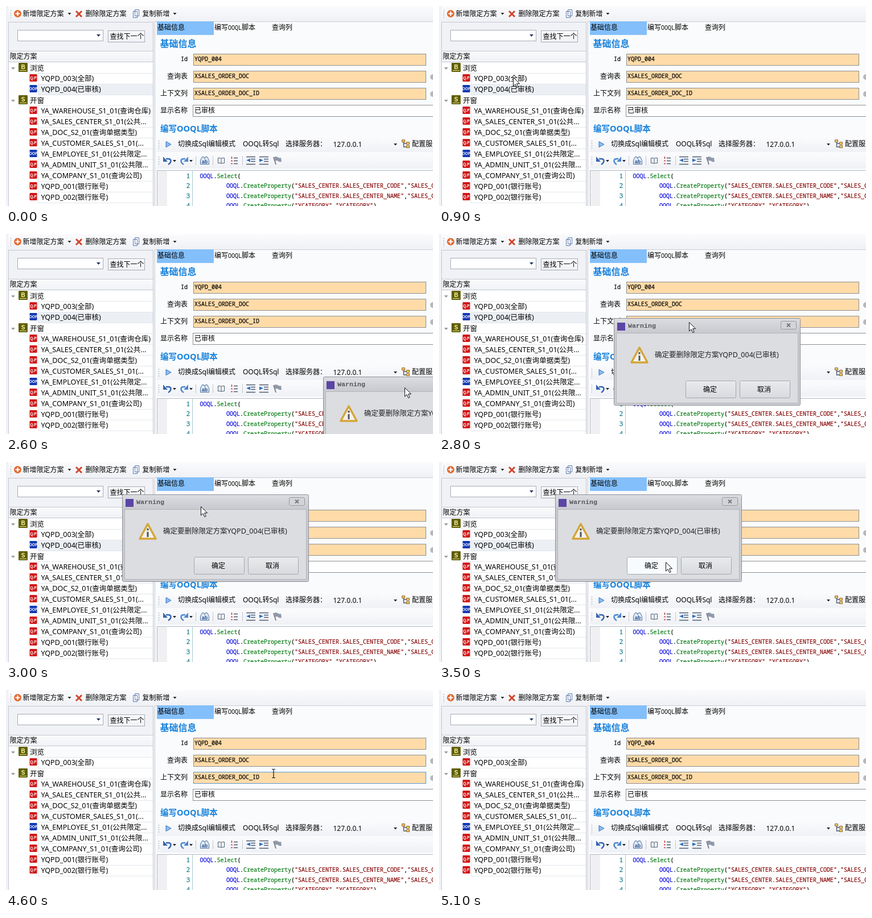
An HTML page for the animation above (5.2 s loop, 750 px wide and 352 px high).

```html
<!DOCTYPE html>
<html lang="zh">
<head>
<meta charset="utf-8">
<title>删除限定方案</title>
<style>
  html, body { margin: 0; width: 100%; height: 100%; overflow: hidden; background: #f1f2f6; }
  svg { display: block; width: 750px; height: 352px; }
  text { font: 12px "Noto Sans", "Noto Sans CJK SC", "Noto Sans CJK", sans-serif; fill: #000; white-space: pre; }
  .tree text.label { font-size: 12.5px; }
  text.mono, tspan.mono { font: 10px "Noto Sans Mono", "Noto Sans CJK SC", monospace; }
  text.mono { stroke: currentColor; stroke-width: .2px; }
  text.head { font-weight: 700; fill: #1681dc; }
  text.icon { font: 700 6.5px "Liberation Sans", sans-serif; fill: #fff; text-anchor: middle; }
  text.num { font: 12px "Liberation Serif", serif; fill: #16808f; stroke: #16808f; stroke-width: .3px; }
  .end { text-anchor: end; }
  .mid { text-anchor: middle; }
  .api { fill: #0a0ae0; stroke: #0a0ae0; }
  .str { fill: #860808; stroke: #860808; }
  .fn { fill: #087c16; stroke: #087c16; }
  .line { fill: none; stroke: #4a5a70; stroke-width: 1.4; }
</style>
</head>
<body>
<svg id="stage" viewBox="0 0 750 352">
  <defs>
    <linearGradient id="bar" x2="0" y2="1">
      <stop stop-color="#fbfbfd"/><stop offset="1" stop-color="#eff1f5"/>
    </linearGradient>
    <linearGradient id="frame" x2="0" y2="1">
      <stop stop-color="#dcdde1"/><stop offset=".16" stop-color="#c9cacf"/><stop offset="1" stop-color="#cbccd1"/>
    </linearGradient>
    <linearGradient id="button" x2="0" y2="1">
      <stop stop-color="#e9eaec"/><stop offset="1" stop-color="#d9dade"/>
    </linearGradient>
    <clipPath id="treeClip"><rect x="4" y="99" width="254" height="253"/></clipPath>
  </defs>

  <rect width="750" height="352" fill="#f1f2f6"/>

  <!-- main toolbar -->
  <rect x="4" width="746" height="27" fill="url(#bar)"/>
  <rect id="hot" x="118.5" y="3.5" width="99" height="21" stroke="#4a90d6"/>
  <path d="M8.500 7v14" stroke="#a8adb8" stroke-dasharray="2 2"/>
  <circle cx="20.500" cy="13.500" r="6.500" fill="#e2672c"/>
  <path d="M20.500 9.500v8M16.500 13.500h8" stroke="#fff" stroke-width="2.200"/>
  <path d="M123 9l10 10M133 9l-10 10" stroke="#d2452f" stroke-width="3"/>
  <path d="M223.500 9.500h7v11h-7zM226.500 6.500h7v11h-7z" fill="#fff" stroke="#5874a8"/>
  <text x="29.500" y="18">新增限定方案</text>
  <text x="139.500" y="18">删除限定方案</text>
  <text x="239.500" y="18">复制新增</text>
  <path d="M108.500 12h6l-3 3.500zM293.500 12h6l-3 3.500z" fill="#222"/>

  <!-- search strip -->
  <path d="M4.500 28v324M4 28.500h255M258.500 28v324" stroke="#c3c7d0" fill="none"/>
  <rect x="20.500" y="42.500" width="150" height="19" fill="#fff" stroke="#a7abb5"/>
  <path d="M159 50h7l-3.500 4z" fill="#1d3660"/>
  <rect x="179.500" y="43.500" width="64" height="20" fill="url(#bar)" stroke="#a7abb5"/>
  <text x="182.500" y="58">查找下一个</text>

  <!-- tree -->
  <rect x="5" y="79" width="253" height="20" fill="url(#bar)"/>
  <path d="M5 79.500h253M5 98.500h253" stroke="#c3c7d0"/>
  <text x="6.500" y="93">限定方案</text>
  <rect x="5" y="99" width="253" height="253" fill="#fff"/>
  <g class="tree" clip-path="url(#treeClip)">
    <g id="before"></g>
    <g id="after"></g>
  </g>

  <!-- form -->
  <rect x="261" y="27" width="489" height="325" fill="#fafbfc"/>
  <path d="M261.500 27v325M261 27.500h489" stroke="#c8ccd4"/>
  <rect x="265" y="27" width="100" height="24" fill="#83bffb"/>
  <text x="266" y="42">基础信息</text>
  <text x="366" y="42">编写<tspan class="mono">OOQL</tspan>脚本</text>
  <text x="467" y="42">查询列</text>
  <text class="head" x="270.500" y="72" style="font-size:16px">基础信息</text>
  <text class="mono end" x="319" y="97">Id</text>
  <text class="end" x="319" y="128">查询表</text>
  <text class="end" x="319" y="158">上下文列</text>
  <text x="271" y="188">显示名称</text>
  <g id="fields"></g>
  <circle cx="750" cy="125" r="5" fill="#b5b7bb"/>
  <circle cx="750" cy="155" r="5" fill="#b5b7bb"/>
  <text class="head" x="271" y="221" style="font-size:14.500px">编写OOQL脚本</text>

  <!-- script toolbars -->
  <rect x="265" y="231" width="485" height="26" fill="url(#bar)"/>
  <rect x="265" y="260" width="485" height="26" fill="url(#bar)"/>
  <path d="M268.500 237v14M268.500 265v14" stroke="#a8adb8" stroke-dasharray="2 2"/>
  <path d="M281 238.500l9 5-9 5z" fill="#8dbcf0" stroke="#2d74c4"/>
  <text x="302" y="247">切换成Sql编辑模式</text>
  <text x="416" y="247">OOQL转Sql</text>
  <text x="491" y="247">选择服务器：</text>
  <text x="574.500" y="247.500">127.0.0.1</text>
  <path d="M681 242h6l-3 3.500z" fill="#222"/>
  <path d="M698.500 237v11h5M698.500 242h5" class="line"/>
  <path d="M695.500 235.500h5v4h-5zM703.500 239.500h5v4h-5zM703.500 245.500h5v4h-5z" fill="#f5c469" stroke="#8a6a30"/>
  <text x="713" y="247">配置服务器</text>
  <path d="M281 269h4c6 0 6 6 0 10" fill="none" stroke="#3566ae" stroke-width="2.500"/>
  <path d="M276 265v9h8z" fill="#3566ae"/>
  <path d="M315 269h-3c-6 0-6 6 0 10" fill="none" stroke="#4b86ce" stroke-width="2.500"/>
  <path d="M320 265v9h-8z" fill="#4b86ce"/>
  <path d="M293 271h6l-3 3.500zM322 271h6l-3 3.500z" fill="#222"/>
  <path d="M333.500 264v16M363.500 264v16M415.500 264v16" stroke="#c3c7d0"/>
  <path d="M341.500 278.500v-7l3-6h3l1.500 3 1.500-3h3l3 6v7z" fill="#dfe8f3" stroke="#486d9f"/>
  <text class="icon" x="349" y="277" style="font-size:9px;fill:#24508c">ab</text>
  <path d="M372.500 267.500h4l1.500 1 1.500-1h4v9h-4l-1.500 1-1.500-1h-4zM378 268v9" class="line" style="stroke-width:1"/>
  <path d="M400 267.500h7M400 272.500h7M400 277.500h7" class="line"/>
  <path d="M396.500 265v4M395 272.500h3M395 277.500h3" stroke="#c33" stroke-width="1.500"/>
  <g id="indents"></g>
  <path d="M470 266l4 13" stroke="#667" stroke-width="1.500"/>
  <path d="M471 266q4-2 6 0t6 1l1 7q-4 1-6-1t-5 0z" fill="#8e99aa"/>

  <!-- editor -->
  <rect x="265.500" y="289.500" width="490" height="70" fill="#fff" stroke="#b4b9c4"/>
  <rect x="266" y="290" width="17" height="62" fill="#f0f0f2"/>
  <path d="M327.500 290v62" stroke="#a9c9d0"/>
  <g id="code"></g>

  <!-- tooltip -->
  <g id="tip">
    <rect x="158" y="48" width="85" height="22" fill="#000" opacity=".25"/>
    <rect x="156.500" y="46.500" width="84" height="21" fill="#fbfbfc" stroke="#777"/>
    <text x="162" y="61" style="fill:#555">删除限定方案</text>
  </g>

  <!-- dialog -->
  <g id="dialog">
    <rect x=".5" y=".5" width="327" height="153" rx="2" fill="url(#frame)" stroke="#8f9198"/>
    <rect x="4.500" y="26.500" width="319" height="123" fill="#dcdde1" stroke="#b3b5bc"/>
    <rect x="6" y="8" width="14" height="14" fill="#5b45a5"/>
    <text x="25" y="17" style="font:700 11.670px 'Liberation Mono',monospace;fill:#55565c">Warning</text>
    <rect x="293.500" y="5.500" width="27" height="14" rx="2" fill="#d3d4d8" stroke="#9799a0"/>
    <path d="M304 9.500l6 6M310 9.500l-6 6" stroke="#73757c" stroke-width="1.800"/>
    <path d="M45 52l14 26h-28z" fill="#f4f2ec" stroke="#d3a638" stroke-width="3.500" stroke-linejoin="round"/>
    <path d="M45 60v3.500M45 66v9" stroke="#50545c" stroke-width="3"/>
    <text x="72" y="69" style="font-size:12.500px;fill:#222">确定要删除限定方案YQPD_004(已审核)</text>
    <rect id="ok" x="126.500" y="110.500" width="88" height="30" rx="2" stroke="#a6a8af"/>
    <rect x="221.500" y="110.500" width="88" height="30" rx="2" fill="url(#button)" stroke="#a6a8af"/>
    <text class="mid" x="169" y="130">确定</text>
    <text class="mid" x="264" y="130">取消</text>
  </g>

  <!-- pointers -->
  <path id="arrow" d="M.5 .5v15.500l3.600-3.400 2.700 6 2.400-1.100-2.600-5.800h5z" fill="#fff" stroke="#111"/>
  <path id="beam" d="M-3 -7.500h2.500l.5 .5 .5-.5h2.500M0 -7v14M-3 7.500h2.500l.5-.5 .5 .5h2.500" fill="none" stroke="#111" stroke-width="1.200"/>
</svg>

<script>
const LOOP = 5200, STEP = 100;
const $ = id => document.getElementById(id);
const show = (id, on) => $(id).setAttribute('visibility', on ? 'visible' : 'hidden');
const fill = (id, color) => $(id).setAttribute('fill', color);

// Tree rows: groups start with an icon letter, blue items with "*".
const windows = [
  'S:开窗', 'YA_WAREHOUSE_S1_01(查询仓库)', 'YA_SALES_CENTER_S1_01(公共...',
  'YA_DOC_S2_01(查询单据类型)', 'YA_CUSTOMER_SALES_S1_01(...',
  '*YA_EMPLOYEE_S1_01(公共限定...', 'YA_ADMIN_UNIT_S1_01(公共限...',
  'YA_COMPANY_S1_01(查询公司)', 'YQPD_001(银行账号)', 'YQPD_002(银行账号)'
];
const browse = ['B:浏览', 'YQPD_003(全部)'];

function row(name, i, picked) {
  const y = 109 + 19 * i, group = name[1] === ':', blue = name[0] === '*';
  const x = group ? 41 : 57;
  const label = name.slice(group ? 2 : blue ? 1 : 0);
  const icon = group
    ? `<path d="M9 ${y - 1}h7l-3.500 4z" fill="#9a9a9a"/>
       <rect x="22" y="${y - 9}" width="16" height="16" rx="1" fill="#5e5e08"/>
       <path d="M24 ${y + 4.5}h12" stroke="#e9e58c"/>
       <text class="icon" x="30" y="${y + 2}" style="font-size:10px;fill:#fbf7a0">${name[0]}</text>`
    : `<rect x="41.500" y="${y - 8}" width="13" height="13" rx="1" fill="${blue ? '#1238b4' : '#d01818'}"/>
       <text class="icon" x="48" y="${y + 1}">${blue ? 'OOP' : 'Q.P'}</text>`;
  return `<rect class="${picked ? 'picked' : ''}" x="${x}" y="${y - 9}" width="${258 - x}" height="18" fill="#fff"/>
    <path d="M${x} ${y + 9.5}H258M${x - .5} ${y - 9}v19" stroke="#e3e6ec"/>
    ${icon}<text class="label" x="${group ? 42 : 61.5}" y="${y + (group ? 4.5 : 3.5)}">${label}</text>`;
}
const rows = (list, picked) => list.map((name, i) => row(name, i, i === picked)).join('');
$('before').innerHTML = rows([...browse, '*YQPD_004(已审核)', ...windows], 2);
$('after').innerHTML = rows([...browse, ...windows], 0);
const [pickedItem, pickedGroup] = document.querySelectorAll('.picked');

$('fields').innerHTML = ['YQPD_004', 'XSALES_ORDER_DOC', 'XSALES_ORDER_DOC_ID', '已审核'].map((value, i) => {
  const last = i === 3, y = 84 + 30 * i;
  return `<rect x="${last ? 328.5 : 329.5}" y="${y + .5}" width="${last ? 430 : 408}" height="20"
      fill="${last ? '#fff' : '#ffdba8'}" stroke="#8d8f94"/>
    <text class="${last ? '' : 'mono'}" x="331" y="${y + (last ? 14 : 13)}">${value}</text>`;
}).join('');
const fieldBoxes = [...$('fields').querySelectorAll('rect')];

$('indents').innerHTML = [[422, -1], [445, 1]].map(([x, dir]) =>
  `<path d="M${x} 265.500h16M${x + 8} 269.500h8M${x + 8} 273.500h8M${x} 278.500h16" class="line"/>
   <path d="M${x + 3.5 - 3.5 * dir} 268.500v6l${7 * dir}-3z" fill="#2f6fc0"/>`).join('');

const call = (fn, ...args) => `<tspan class="api">OOQL</tspan>.<tspan class="fn">${fn}</tspan>(` +
  args.map(a => `<tspan class="str">"${a}"</tspan>`).join(',');
$('code').innerHTML = [
  call('Select'),
  call('CreateProperty', 'SALES_CENTER.SALES_CENTER_CODE', 'SALES_CENTER_CODE'),
  call('CreateProperty', 'SALES_CENTER.SALES_CENTER_NAME', 'SALES_CENTER_NAME'),
  call('CreateProperty', 'YCATEGORY', 'YCATEGORY') + ')'
].map((line, i) => {
  const y = 303 + 17.3 * i;
  return `<text class="num end" x="323" y="${y}">${i + 1}</text>
    <text class="mono" x="${i ? 387 : 340.5}" y="${y}">${line}</text>`;
}).join('');

// Tracks are [time, ...values], linear between entries.
const pointer = [
  [200, 660, 28], [400, 470, 36], [700, 148, 63], [900, 130, 125], [1000, 128, 135],
  [1100, 132, 112], [1300, 156, 16], [1400, 157, 13], [2000, 157, 13], [2500, 700, 270],
  [2600, 700, 270], [2800, 439, 155], [3000, 342, 78], [3200, 342, 78], [3500, 398, 176],
  [3900, 398, 176], [4200, 371, 181], [4400, 371, 181], [4700, 520, 130], [5000, 700, 154]
];
const dialog = [
  [2100, 557, 251, .5], [2200, 557, 251, 1], [2600, 557, 251, 1], [2800, 307, 148, 1],
  [3000, 204, 57, 1], [3900, 204, 57, 1], [4000, 204, 57, .85], [4200, 204, 57, .1], [4300, 204, 57, 0]
];

function at(track, t) {
  let i = track.findIndex(k => k[0] > t);
  if (i < 0) return track[track.length - 1].slice(1);
  if (!i) return track[0].slice(1);
  const a = track[i - 1], b = track[i], u = (t - a[0]) / (b[0] - a[0]);
  return a.slice(1).map((v, n) => v + (b[n + 1] - v) * u);
}

function draw(t) {
  const [px, py] = at(pointer, t).map(Math.round);
  const visible = t >= 200 && t < 5100, text = t >= 4100;
  for (const id of ['arrow', 'beam']) $(id).setAttribute('transform', `translate(${px} ${py})`);
  show('arrow', visible && !text);
  show('beam', visible && text);
  fieldBoxes.forEach((box, i) => {
    const top = 84 + 30 * i;
    box.setAttribute('stroke', visible && t >= 4400 && py >= top && py <= top + 20 ? '#5b9bd8' : '#8d8f94');
  });

  show('hot', t >= 1300 && t < 2000);
  fill('hot', t < 1800 ? '#a4cffa' : '#78b8f6');
  show('tip', t >= 1500 && t < 2000);

  const removed = t >= 4000;
  show('before', !removed);
  show('after', removed);
  pickedItem.setAttribute('fill', t >= 1000 && t < 2000 ? '#e3edfd' : '#eceff4');
  pickedGroup.setAttribute('fill', t < 4400 ? '#e9effb' : '#fafbfd');

  const [dx, dy, alpha] = at(dialog, t);
  const scale = t < 4000 ? 1 : 1 - .035 * Math.min(1, (t - 3900) / 300);
  show('dialog', t >= 2100 && t < 4300);
  $('dialog').setAttribute('opacity', alpha);
  $('dialog').setAttribute('transform',
    `translate(${Math.round(dx) + 164 * (1 - scale)} ${Math.round(dy) + 77 * (1 - scale)}) scale(${scale})`);
  fill('ok', t >= 3400 && t < 3700 ? '#f8fbfe' : t >= 3700 && t < 3900 ? '#cfdff0' : 'url(#button)');
}

const start = performance.now();
function tick() {
  const t = Math.max(0, performance.now() - start) % LOOP;
  draw(Math.floor(t / STEP) * STEP);
  requestAnimationFrame(tick);
}
tick();
</script>
</body>
</html>
```
